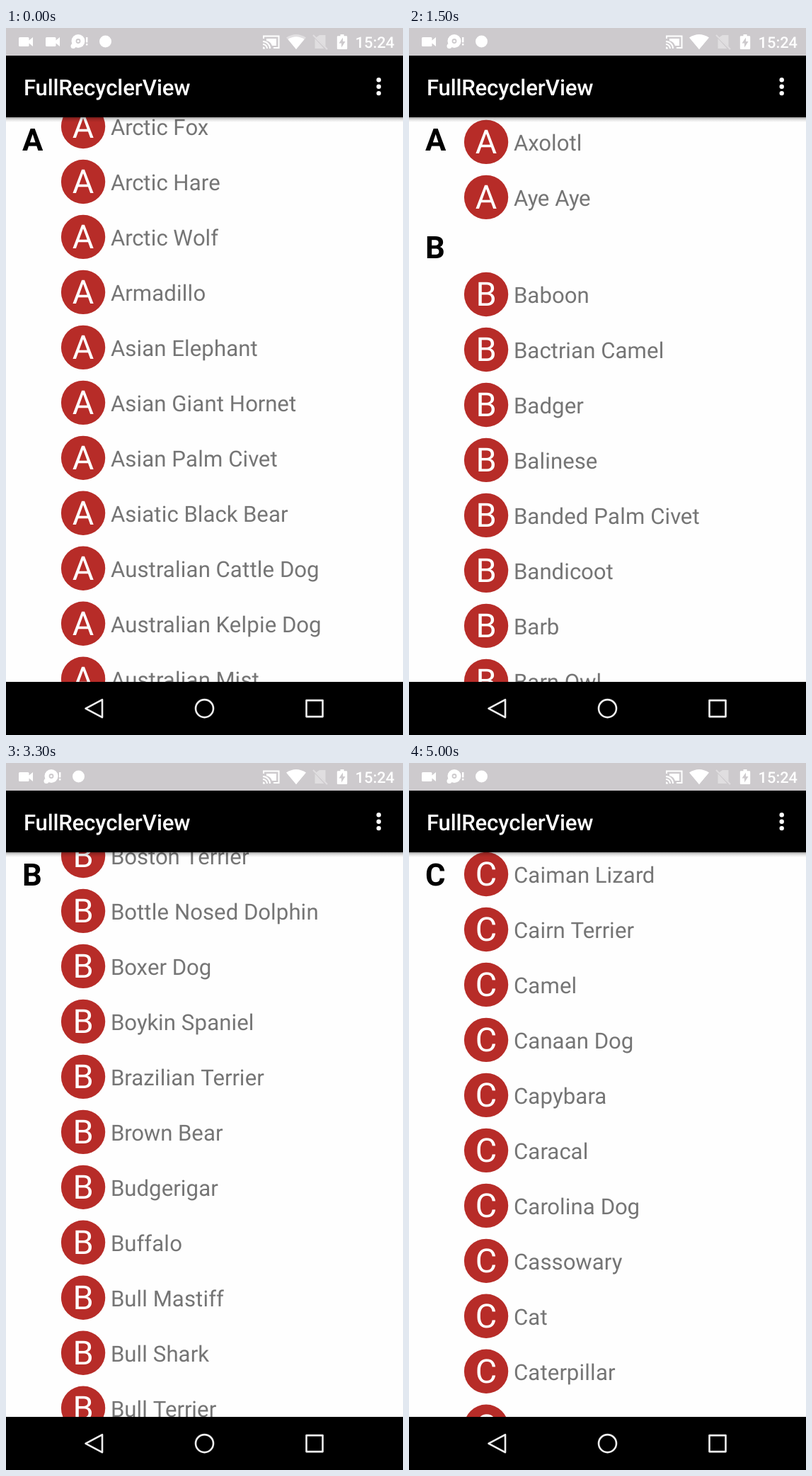
Animation of 561x998 px, one loop 5.1 s. Source, as an HTML page:

```html
<!DOCTYPE html>
<html lang="en">
<head>
<meta charset="utf-8">
<title>FullRecyclerView</title>
<style>
  html, body { margin: 0; width: 100%; height: 100%; overflow: hidden; background: #fefefe; }
  svg { display: block; width: 561px; height: 998px; }
  text { font-family: Roboto, "Open Sans", sans-serif; text-rendering: geometricPrecision; white-space: pre; fill: #fff; }
  .name { fill: #757575; }
  .badge { font-size: 46.75px; text-anchor: middle; }
  .head { font-size: 43.6px; font-weight: 700; fill: #000; }
</style>
</head>
<body>
<svg viewBox="0 0 561 998" xmlns="http://www.w3.org/2000/svg">
  <defs>
    <clipPath id="view"><rect y="126" width="561" height="797"/></clipPath>
    <linearGradient id="shade" x2="0" y2="1">
      <stop offset="0" stop-color="#000" stop-opacity=".36"/>
      <stop offset=".45" stop-color="#000" stop-opacity=".12"/>
      <stop offset="1" stop-color="#000" stop-opacity="0"/>
    </linearGradient>
    <path id="camera" d="M19.5 13H31q1.500 0 1.500 1.500V17.500L38 13V26L32.500 21.500V24.500Q32.500 26 31 26H19.500Q18 26 18 24.500V14.500Q18 13 19.500 13Z"/>
  </defs>
  <rect width="561" height="998" fill="#fefefe"/>
  <g clip-path="url(#view)">
    <g id="rows"></g>
    <g id="heads"></g>
  </g>
  <rect y="126" width="561" height="7" fill="url(#shade)"/>

  <rect width="561" height="39" fill="#cdcacd"/>
  <g fill="#fff">
    <use href="#camera"/>
    <use id="extra" href="#camera" x="38"/>
    <g id="notes">
      <circle cx="102" cy="18.500" r="9.500"/>
      <circle cx="95" cy="25.500" r="3.500"/>
      <circle cx="102" cy="18.500" r="3.400" fill="#cdcacd"/>
      <circle cx="102" cy="18.500" r="1.600"/>
      <path d="M113 13h2.400v7.500H113zM113 22h2.400v2.500H113z"/>
      <circle cx="140.500" cy="19" r="8.500"/>
    </g>
    <g fill="none" stroke="#fff" stroke-width="2">
      <path d="M364 15V11.500H385.500V28H378"/>
      <path d="M363 19a10 10 0 0 1 10 10M363 23a6 6 0 0 1 6 6"/>
    </g>
    <path d="M363 26.500a3 3 0 0 1 3 3h-3zM368 15h14v10h-6q-2-6-8-7z"/>
    <path id="wifiFull" d="M396 13.500Q410 4.500 424 13.500L410 30Z" opacity=".4"/>
    <path d="M398.500 16Q410 8.500 421.500 16L410 30Z"/>
    <g opacity=".38">
      <path d="M443 10h8.500v16L438 13.500zM436.500 15v14h13z"/>
      <path d="M434 10L454 30" stroke="#fff" stroke-width="1.800"/>
    </g>
    <path d="M472.500 9h5v2.300h3.500q1.200 0 1.200 1.200v16.300q0 1.200-1.200 1.200h-12q-1.200 0-1.200-1.200V12.500q0-1.200 1.200-1.200h3.500z"/>
    <path d="M476 13.500L470.500 21.500h3.500v6l5.500-8.500H476z" fill="#cdcacd"/>
  </g>

  <rect y="39" width="561" height="87"/>
  <g fill="#fff">
    <circle cx="526.700" cy="73.300" r="3.200"/>
    <circle cx="526.700" cy="82.700" r="3.200"/>
    <circle cx="526.700" cy="92.100" r="3.200"/>
  </g>
  <g id="labels"></g>

  <rect y="923" width="561" height="75"/>
  <g fill="none" stroke="#eee" stroke-width="2.600" stroke-linejoin="round">
    <path d="M136 948.100V973.100L112.500 960.600Z"/>
    <circle cx="280.500" cy="960.600" r="12.500"/>
    <rect x="424.500" y="949.100" width="23" height="23"/>
  </g>
</svg>
<script>
const LOOP = 5100, STEP = 100;
const TOP = 126, PITCH = 77.97, HEAD = 59.2, FIRST = 139;
const SCALE = 561 / 1080; // stage pixels per device pixel

const names = `Arctic Fox,Arctic Hare,Arctic Wolf,Armadillo,Asian Elephant,Asian Giant Hornet,
Asian Palm Civet,Asiatic Black Bear,Australian Cattle Dog,Australian Kelpie Dog,Australian Mist,
Australian Shepherd,Australian Terrier,Avocet,Axolotl,Aye Aye,
Baboon,Bactrian Camel,Badger,Balinese,Banded Palm Civet,Bandicoot,Barb,Barn Owl,Barnacle,Barracuda,
Basenji Dog,Basking Shark,Basset Hound,Bat,Bavarian Mountain Hound,Beagle,Bear,Bearded Collie,
Bearded Dragon,Beaver,Bedlington Terrier,Beetle,Bengal Tiger,Bernese Mountain Dog,Bichon Frise,
Binturong,Bird,Birds Of Paradise,Birman,Bison,Black Bear,Black Rhinoceros,Black Russian Terrier,
Black Widow Spider,Bloodhound,Blue Lacy Dog,Blue Whale,Bluetick Coonhound,Bobcat,Bolognese Dog,
Bombay,Bongo,Bonobo,Booby,Border Collie,Border Terrier,Bornean Orang-utan,Borneo Elephant,
Boston Terrier,Bottle Nosed Dolphin,Boxer Dog,Boykin Spaniel,Brazilian Terrier,Brown Bear,Budgerigar,
Buffalo,Bull Mastiff,Bull Shark,Bull Terrier,Bulldog,Bullfrog,Bumble Bee,Burmese,Burrowing Frog,
Butterfly,Butterfly Fish,
Caiman,Caiman Lizard,Cairn Terrier,Camel,Canaan Dog,Capybara,Caracal,Carolina Dog,Cassowary,Cat,
Caterpillar,Catfish`.split(/,\s*/);

// time, scroll offset, speed in px per ms
const flings = [
  [0, 0, 1.38], [800, 648.7, .29], [1100, 690, 0], [1200, 690, 0],
  [1200, 690, 1.45], [1500, 1069.7, 1.09], [2100, 1497.1, .31], [2300, 1530, 0], [2600, 1530, 0],
  [2600, 1530, 8.2], [3300, 5057.3, 2.5], [4000, 6181.8, .85], [4400, 6416, .38], [5000, 6571.9, .14]
];

const $ = id => document.getElementById(id);
const pen = document.createElement("canvas").getContext("2d");

function add(parent, tag, attrs, text) {
  const el = document.createElementNS("http://www.w3.org/2000/svg", tag);
  for (const key in attrs) el.setAttribute(key, attrs[key]);
  if (text) el.textContent = text;
  return parent.appendChild(el);
}

const move = (el, x, y) => el.setAttribute("transform", `translate(${x} ${y})`);

// Sets text the way the device does: glyph advances rounded to whole device pixels
function label(parent, cls, text, x, y, size, weight) {
  pen.font = `${weight} 2000px Roboto, "Open Sans", sans-serif`;
  const width = s => pen.measureText(s).width * size / 2000;
  let at = 0;
  const xs = [...text].map((c, i) => {
    const place = x + Math.round(at) * SCALE;
    const next = text[i + 1];
    at += Math.round(width(c));
    if (next) at += width(c + next) - width(c) - width(next);
    return place.toFixed(2);
  });
  add(parent, "text", { class: cls, x: xs.join(" "), y, "font-size": size * SCALE, "font-weight": weight }, text);
}

label($("labels"), "clock", "15:24", 493.5, 27.5, 42, 500);
label($("labels"), "title", "FullRecyclerView", 24.9, 95, 60, 500);

const heads = [];
let y = FIRST, letter = "";
for (const name of names) {
  if (name[0] !== letter) {
    const el = add($("heads"), "text", { class: "head", x: 23.1, y: 47.3 }, name[0]);
    heads.push({ el, top: letter ? y - PITCH / 2 : -PITCH });
    if (letter) y += HEAD;
    letter = name[0];
  }
  const row = add($("rows"), "g", {});
  move(row, 0, y);
  add(row, "circle", { cx: 109.07, cy: 0, r: 31.17, fill: "#b72c28" });
  add(row, "text", { class: "badge", x: 109.07, y: 16.2 }, letter);
  label(row, "name", name, 148.04, 12.3, 60, 400);
  y += PITCH;
}

// Cubic Hermite between the fling points
function scrollAt(t) {
  let i = flings.length - 2;
  while (flings[i][0] > t) i--;
  const [t0, y0, v0] = flings[i], [t1, y1, v1] = flings[i + 1];
  const d = t1 - t0, u = (t - t0) / d, w = 1 - u;
  return y0 * w * w * (1 + 2 * u) + y1 * u * u * (3 - 2 * u) + d * u * w * (v0 * w - v1 * u);
}

function draw(t) {
  const scroll = scrollAt(t);
  move($("rows"), 0, -scroll);
  heads.forEach(({ el, top }, i) => {
    const next = heads[i + 1];
    const limit = next ? next.top - scroll - HEAD : Infinity;
    move(el, 0, Math.min(Math.max(TOP, top - scroll), limit));
  });
  const early = t < 300;
  $("extra").style.display = early ? "" : "none";
  move($("notes"), early ? 0 : -38, 0);
  $("wifiFull").setAttribute("opacity", t < 1500 ? .4 : 1);
}

const start = performance.now();
function tick() {
  const t = (performance.now() - start) % LOOP;
  draw(Math.floor(t / STEP) * STEP);
  requestAnimationFrame(tick);
}
draw(0);
requestAnimationFrame(tick);
</script>
</body>
</html>
```
